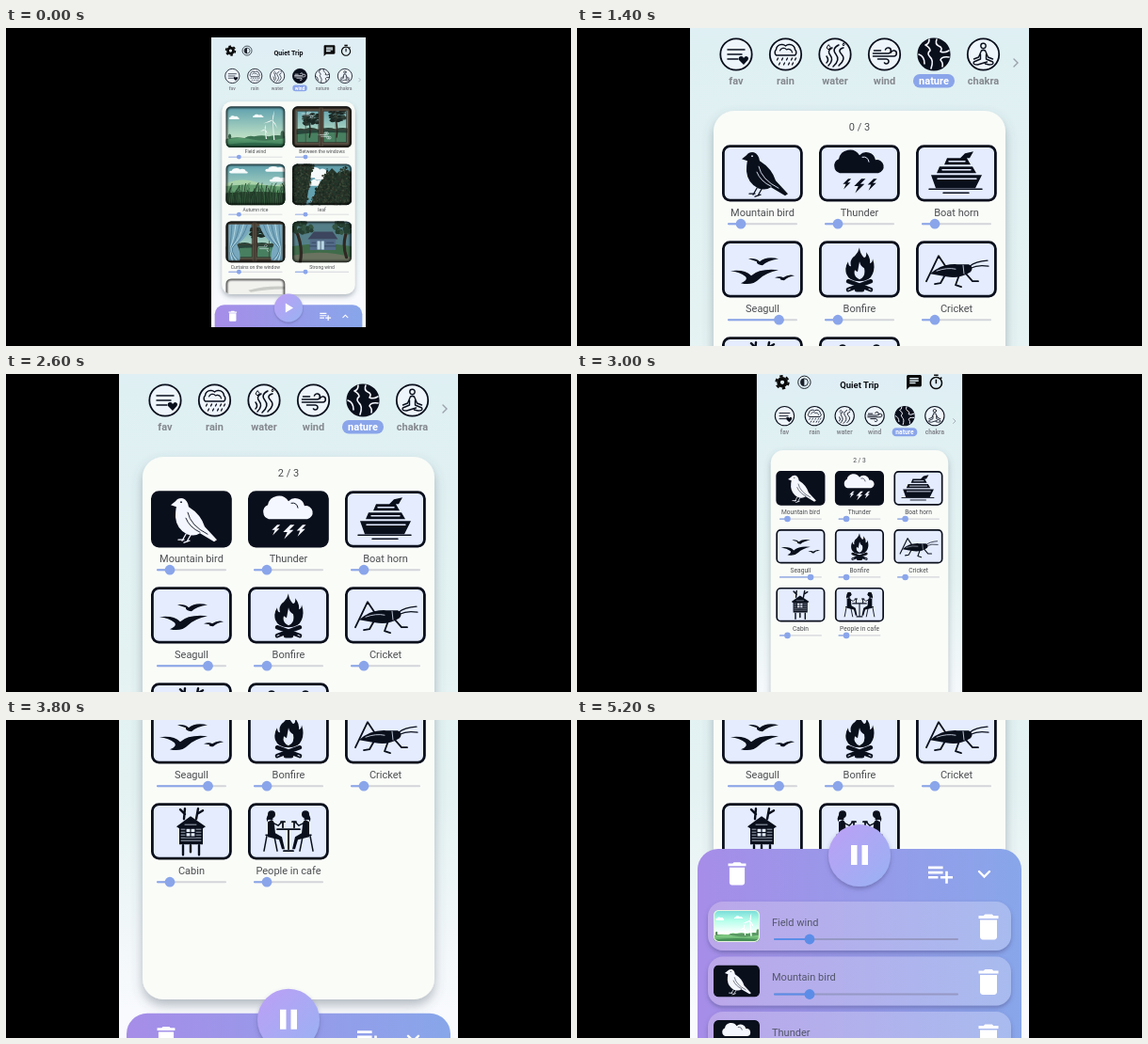
Animation, 600 px wide and 338 px high, one loop 5500 ms. Source, as an HTML page:

```html
<!DOCTYPE html>
<html lang="en">
<head>
<meta charset="utf-8">
<title>Ambient sound app</title>
<style>
html, body { margin: 0; width: 100%; height: 100%; overflow: hidden; background: #000; }
svg { display: block; width: 100vw; height: 100vh; }
text { font-family: Roboto, sans-serif; font-size: 11px; fill: #4b4d50; text-anchor: middle; }
.ink { --ink: #0a0f1c; --paper: #e4ecfd; }
.inv { --ink: #f4f7ff; --paper: #0a0f1c; }
.fill { fill: var(--ink); }
.line { fill: none; stroke: var(--ink); stroke-linecap: round; stroke-linejoin: round; }
.cut { fill: none; stroke: var(--paper); stroke-linecap: round; }
.bright { filter: hue-rotate(-14deg) brightness(1.35); }
</style>
</head>
<body>
<svg id="stage" viewBox="0 0 600 338">
  <defs id="defs">
    <linearGradient id="bg" x2="0" y2="1">
      <stop stop-color="#dfedf5"/><stop offset=".12" stop-color="#dff0f3"/>
      <stop offset=".55" stop-color="#e4f2f2"/><stop offset=".9" stop-color="#f8fafd"/>
    </linearGradient>
    <linearGradient id="bar"><stop stop-color="#a68de8"/><stop offset="1" stop-color="#88a6ea"/></linearGradient>
    <linearGradient id="rowFill"><stop stop-color="#bba7ea"/><stop offset="1" stop-color="#a8bbef"/></linearGradient>
    <linearGradient id="knob" x2="1" y2="1"><stop stop-color="#bd9ff6"/><stop offset="1" stop-color="#98b2f2"/></linearGradient>
    <linearGradient id="sky" x2="0" y2="1"><stop stop-color="#5c9fae"/><stop offset=".8" stop-color="#c4e4c6"/></linearGradient>
    <linearGradient id="grass" x2="0" y2="1"><stop stop-color="#5d9f72"/><stop offset="1" stop-color="#33704e"/></linearGradient>
    <filter id="shade" x="-20%" y="-20%" width="140%" height="150%"><feDropShadow dx="0" dy="6" stdDeviation="6" flood-color="#4a5a66" flood-opacity=".4"/></filter>
    <filter id="small" x="-20%" y="-20%" width="140%" height="150%"><feDropShadow dx="0" dy="2.5" stdDeviation="2" flood-color="#4a4a80" flood-opacity=".45"/></filter>
    <filter id="soft"><feGaussianBlur stdDeviation="2.2"/></filter>
    <clipPath id="phoneClip"><rect width="360" height="676"/></clipPath>
    <clipPath id="cardClip"><rect x="25" y="150" width="310" height="449" rx="22"/></clipPath>
    <clipPath id="tileClip"><rect width="138" height="96" rx="12"/></clipPath>
    <clipPath id="thumbClip"><rect width="49" height="34" rx="5"/></clipPath>
  </defs>
  <rect width="600" height="338"/>
  <g id="phone" clip-path="url(#phoneClip)"><g id="screen"></g><g id="panel"></g></g>
</svg>
<script>
const $ = id => document.getElementById(id);
const rect = (x, y, w, h, r, a = '') => `<rect x="${x}" y="${y}" width="${w}" height="${h}" rx="${r}" ${a}/>`;
const path = (d, a = 'class="fill"') => `<path d="${d}" ${a}/>`;
const line = (d, w = 1.5) => path(d, `class="line" stroke-width="${w}"`);
const cut = (d, w = 1) => path(d, `class="cut" stroke-width="${w}"`);
const fill = (d, c) => path(d, `fill="${c}"`);
const stroke = (d, c, w) => path(d, `fill="none" stroke="${c}" stroke-width="${w}" stroke-linecap="round"`);
const dot = (x, y, r, a = 'class="fill"') => `<circle cx="${x}" cy="${y}" r="${r}" ${a}/>`;
const text = (x, y, s, a = '') => `<text x="${x}" y="${y}" ${a}>${s}</text>`;
const at = (x, y, s, body, a = '') => `<g transform="translate(${x} ${y}) scale(${s})" ${a}>${body}</g>`;
const many = (n, f) => Array.from({ length: n }, (_, i) => f(i)).join('');
let seed = 7;
const rnd = (a, b) => a + (b - a) * ((seed = seed * 16807 % 2147483647) / 2147483647);

// Glyphs on a 24 px grid
const glyph = {
  chat: 'M20 2H4c-1.1 0-2 .9-2 2v18l4-4h14c1.1 0 2-.9 2-2V4c0-1.1-.9-2-2-2zM6 9h12v2H6V9zm8 5H6v-2h8v2zm4-6H6V6h12v2z',
  timer: 'M15 1H9v2h6V1zm-4 13h2V8h-2v6zm8.03-6.61l1.42-1.42c-.43-.51-.9-.99-1.41-1.41l-1.42 1.42C16.07 4.74 14.12 4 12 4c-4.97 0-9 4.03-9 9s4.02 9 9 9 9-4.03 9-9c0-2.12-.74-4.07-1.97-5.61zM12 20c-3.87 0-7-3.13-7-7s3.13-7 7-7 7 3.13 7 7-3.13 7-7 7z',
  trash: 'M6 19c0 1.1.9 2 2 2h8c1.1 0 2-.9 2-2V7H6v12zM19 4h-3.5l-1-1h-5l-1 1H5v2h14V4z',
  add: 'M14 10H2v2h12v-2zm0-4H2v2h12V6zm4 8v-4h-2v4h-4v2h4v4h2v-4h4v-2h-4zM2 16h8v-2H2v2z',
};
const icon = (name, x, y, s, c) => at(x - 12 * s, y - 12 * s, s, fill(glyph[name], c));

// Category icons, centred on 0,0
const tabs = {
  fav: line('M-9-5H9M-9 0H6M-9 5H2') + path('M8 11L3 6Q2 2 5.5 2Q7.5 2 8 4Q9 2 11 2Q14 3 12.5 6Z'),
  rain: line('M-10 1a4 4 0 0 1 0-6a6 6 0 0 1 10-4a6 6 0 0 1 10 4a4 4 0 0 1 0 6z') + line('M-6-4a4 4 0 0 1 7-1a4 4 0 0 1 6 3', 1.2) +
    line('M-8 4l-1 2M-3 4l-1 2M2 4l-1 2M7 4l-1 2M11 4l-1 2M-6 9l-1 2M-1 9l-1 2M4 9l-1 2M8 9l-1 2', 1.3),
  water: line('M-7 12Q-1 6-5 1T-3-7M-2 13Q6 6 1 0T4-10M4 12Q12 5 7 0T9-7M-9 9Q-6 6-9 2', 1.5) +
    line('M-7-10l-2 3 2 2 2-2zM9-12l-1 2 1 1 1-1z', 1),
  wind: line('M-12-1H4a3 3 0 1 0-3-4M-12 2H10a3 3 0 1 0-3-4M-7 5H2a2.5 2.500 0 1 1-2 4M-11-4H-4', 1.6),
  nature: line('M-5-16Q-5-11-9-10Q-4-7-4-4Q-8-1-4 3Q0 6-3 15M3-16Q1-11 5-9Q10-7 7-3Q11-1 16-4M16 3Q8 2 7 6Q10 9 9 13M-16 0Q-10 2-10 10', 1.6),
  chakra: dot(0, -9, 2.7, 'class="line" stroke-width="1.400"') +
    line('M-2-4Q0-5 2-4L5 3 10 5M-2-4L-5 3-10 5M-3 0V5L-10 8Q-12 11-6 11L4 8M3 0V5L10 8Q12 11 6 11L2 10', 1.4),
};

// Nature icons, 86 x 61
const bolt = (x, s) => at(x, 36, s, path('M0 0l-7 7h4l-3 7 9-9h-4l5-5z'));
const sitter = dot(25, 12, 4) + path('M22 11Q18 17 21 20L27 17ZM21 18Q28 17 28 23L29 32 36 36 39 49 36 49 33 39 21 36Z') +
  line('M26 21L32 24 36 20M19 34H29M20 35L17 51M28 36L31 51', 1.5);
const nature = {
  'Mountain bird': path('M21 15L26 11Q29 7 34 8Q39 10 40 17Q53 25 57 38L70 52 67 54 52 45Q46 49 38 46Q27 40 26 28Q26 20 27 17Z') +
    line('M37 46L33 53M42 47L38 54M29 52L35 52M35 55L41 53', 1.3) + cut('M39 23Q42 37 60 46M37 29Q41 39 52 44', .9) + dot(32, 12, .9, 'fill="var(--paper)"'),
  Thunder: path('M22 30a8 8 0 0 1-1-15a12 12 0 0 1 22-4a10 10 0 0 1 17 5a7 7 0 0 1 3 14z') +
    cut('M46 13Q52 12 53 18') + bolt(31, .8) + bolt(45, 1.1) + bolt(58, .9),
  'Boat horn': path('M16 32H70L63 46H21ZM22 30L25 23H60L64 30ZM30 21L33 14H54L58 21ZM47 14L52 9 61 7 57 14Z') +
    line('M14 47H70M29 51H56') + cut('M28 26.500H58M35 17.500H52M23 36H64', 1.4),
  Seagull: path('M9 32Q24 30 31 37Q40 29 60 31Q46 34 39 41Q32 48 20 45Q28 42 25 38Q19 33 9 32ZM28 19Q36 18 40 22Q47 16 60 19Q48 21 43 26Q36 25 37 22ZM56 39Q62 37 65 39Q71 35 77 37Q70 38 66 42Q61 42 62 40Z'),
  Bonfire: path('M43 7Q43 13 48 18Q51 17 50 12Q55 18 54 24Q57 23 57 19Q60 28 57 35Q54 43 43 43Q32 43 29 35Q27 28 31 22Q31 27 34 27Q32 20 38 16Q42 12 43 7Z') +
    path('M43 22Q44 27 48 29Q50 38 43 41Q36 38 38 31L41 33Z', 'fill="var(--paper)"') +
    line('M31 52L55 43M55 52L31 43M40 52L46 52', 4.5) + cut('M31 52l2-.7M55 52l-2-.7'),
  Cricket: path('M15 35Q27 24 44 25L56 25Q62 28 58 33Q46 41 32 38Z') +
    line('M57 27Q63 22 76 21M58 29Q66 25 77 27', 1.2) + line('M36 34L24 16 11 43M46 36L42 47 48 49M53 35L60 43 66 43M31 36L26 45 20 46', 1.8) + cut('M22 32Q33 28 42 30M50 26L51 35', .8),
  Cabin: path('M27 25L42 14 58 25 55 27V44H30V27Z') + line('M34 45V55M51 45V55M42 45V52M35 17L36 6M36 12L31 7M48 17L50 6M50 11L55 8', 2.4) +
    cut('M32 28H53M32 31H53M32 34H53M32 37H53M32 40H53M36 23H48', .7) + rect(37, 27, 10, 9, 0, 'fill="var(--paper)"') + line('M42 27V36M37 31.500H47M37 27H47V36H37Z', 1.2),
  'People in cafe': sitter + at(86, 0, 1, at(0, 0, '-1 1', sitter)) + line('M31 28H55M43 28V49M38 51H48M37 26V20M49 26V20M35 20H39M47 20H51', 1.8),
};

// Wind scenes, 138 x 96
const sky = '<rect width="138" height="96" fill="url(#sky)"/>';
const cloud = (x, y, sx, sy = sx) => at(x, y, `${sx} ${sy}`, fill('M-11 4a3 3 0 0 1 1-6a6 6 0 0 1 11-3a5 5 0 0 1 8 4a3 3 0 0 1 2 5z', '#f5fafa'));
const turbine = (x, y, l, base) => fill(`M${x - .7} ${y}h1.400L${x + 5} ${base}h-3z`, '#e4eeea') +
  [-80, 160, 60].map(a => `<path d="M0 0L${l * .4} -1.300L${l} 0L2 1.300z" fill="#f4f8f6" transform="translate(${x} ${y}) rotate(${a})"/>`).join('');
const tree = x => stroke(`M${x + 2} 72Q${x + 6} 54 ${x} 30`, '#2a241f', 3) +
  many(55, () => `<ellipse cx="${x + rnd(-15, 18)}" cy="${rnd(22, 46)}" rx="5" ry="2.200" transform="rotate(-6)" fill="${rnd(0, 1) < .7 ? '#1b2824' : '#2d3e35'}"/>`);
const swirl = (x, y) => stroke(`M${x} ${y}h17a3 3 0 1 0-3-3M${x + 3} ${y + 4}h20a3 3 0 1 1-3 3`, '#dfeeee', 1.3);
const frame = stroke('M3 3H135V93H3Z', '#3d372e', 10) + stroke('M8 8H130V87H8Z', '#574e41', 4) + stroke('M67 6V90', '#574e41', 11) +
  stroke('M67 6V92M12 11H61V84H12ZM73 11H126V84H73Z', '#29241f', 1.4) + stroke('M31 10V85M101 10V85M10 54H128', '#463e33', 1.6);
const outside = sky + fill('M0 60Q30 53 69 58T138 55V96H0Z', '#477f60') +
  fill('M0 59Q14 48 28 53Q46 46 60 54Q84 46 100 53Q120 46 138 54V62Q70 58 0 66Z', '#27443a');
const curtain = fill('M6 7H60Q53 36 26 54Q36 76 32 92H6Z', '#78a8bd') +
  many(5, i => stroke(`M${14 + i * 9} 8Q${12 + i * 7} 40 ${10 + i * 3} 54T${10 + i * 5} 91`, i % 2 ? '#b9dbe4' : '#4f8099', 2));
const leafy = (x, y) => x < 50 - y * .2 + 3 * Math.sin(y / 6) ||
  x > 82 - y * .45 + 3 * Math.sin(y / 5) && y > 15 + 8 * Math.sin(x / 8 + 2) + (x < 80 ? 14 : 0);
const leaves = many(1500, i => {
  const x = rnd(0, 138), y = rnd(0, 96);
  return leafy(x, y) ? dot(x.toFixed(1), y.toFixed(1), rnd(1.2, 2.6).toFixed(1), `fill="${['#1b2a20', '#3a4736', '#2b2d24', '#24382a'][i % 4]}"`) : '';
});
const blades = many(85, i => {
  const x = i * 1.7, h = rnd(44, 74), lean = rnd(-9, 12);
  return stroke(`M${x} 96Q${x} ${h + 10} ${x + lean} ${h}`, ['#1c3226', '#25402c', '#3b6844'][i % 3], rnd(.8, 2.2));
});
const wind = {
  'Field wind': sky + cloud(20, 27, .95, .7) + cloud(76, 23, 1, .6) + fill('M0 76Q20 70 44 74Q52 67 66 70Q84 66 100 70Q118 65 138 69V96H0Z', '#3d7253') +
    turbine(91, 54, 12, 76) + turbine(109, 32, 23, 78) + '<path d="M0 78Q28 70 62 77T138 74V96H0Z" fill="url(#grass)"/>' +
    fill('M0 90Q50 80 138 88V96H0Z', '#2f6b4b') +
    '<ellipse cx="9" cy="70" rx="3.5" ry="6" fill="#39634a"/><ellipse cx="132" cy="66" rx="4.5" ry="9" fill="#426b54"/>',
  'Between the windows': outside + tree(38) + tree(101) + swirl(22, 17) + swirl(60, 66) + frame + swirl(64, 66),
  'Autumn rice': sky + cloud(31, 18, 1.7, 1) + cloud(119, 14, 2, 1.1) + cloud(126, 38, 1.8, 1) + fill('M0 46Q35 30 75 44T138 42V96H0Z', '#a9d3aa') +
    fill('M0 52Q60 44 138 54V96H0Z', '#659f72') + fill('M0 68Q60 62 138 68V96H0Z', '#263f2b') + blades,
  leaf: '<rect width="138" height="96" fill="#62a0ae"/>' + cloud(62, 24, 2.1) + cloud(78, 30, 1.9) + cloud(56, 46, 1.3) +
    fill('M0 0H47L32 96H0ZM43 96L50 76 63 46 74 32 92 10 106 24 124 14 138 20V96Z', '#26342a') + leaves,
  'Curtains on the window': outside + tree(69) + swirl(76, 60) + frame + curtain + at(138, 0, '-1 1', curtain),
  'Strong wind': '<rect width="138" height="96" fill="#547f88"/>' + fill('M0 58Q70 48 138 58V96H0Z', '#3f6b4a') + fill('M0 80Q70 64 138 84V96H0Z', '#6a7360') +
    stroke('M18 96Q26 60 8 20M126 84Q114 50 130 16', '#302823', 7) + many(70, i => dot(i % 2 ? rnd(0, 45) : rnd(95, 138), rnd(2, 27), 5, `fill="${i % 3 ? '#253f32' : '#335441'}"`)) +
    fill('M36 42L50 24H94L106 42Z', '#3c465e') + rect(41, 42, 60, 25, 0, 'fill="#536b88"') + rect(58, 46, 16, 20, 0, 'fill="#b8d7e6"') +
    stroke('M66 46V66M46 50H54M80 50H96M41 58H56M76 58H101', '#293850', 1.5),
  '': '<rect width="138" height="96" fill="#f1f2ee"/>' + fill('M52 27Q90 16 138 18L138 24Q90 25 58 31Z', '#c9cbc7'),
};

const slug = s => s.replace(/ /g, '-');
const inset = rect(0, 0, 138, 96, 12, 'fill="none" stroke="#000" stroke-width="7" opacity=".75" filter="url(#soft)"');
$('defs').insertAdjacentHTML('beforeend',
  Object.entries(wind).map(([k, v]) => `<g id="w-${slug(k)}">${v}</g>`).join('') +
  Object.entries(nature).map(([k, v]) => `<g id="n-${slug(k)}">${v}</g>`).join(''));

const slider = (x, y, w, v, c = '#8aa5ea', rail = '#d3d5da') =>
  rect(x, y - 1, w, 2, 1, `fill="${rail}"`) + rect(x, y - 1, v, 2, 1, `fill="${c}"`) + dot(x + v, y, 5.4, `fill="${c}"`);

const header = at(45, 31, 1, dot(0, 0, 6.5, 'fill="none" stroke="#0a0a0a" stroke-width="6"') +
    dot(0, 0, 10.8, 'fill="none" stroke="#0a0a0a" stroke-width="3.6" pathLength="48" stroke-dasharray="4"')) +
  dot(83.5, 31, 11, 'fill="none" stroke="#1a1f28" stroke-width="1.6"') + dot(83.5, 31, 6.5, 'fill="none" stroke="#1a1f28" stroke-width="1.5"') +
  fill('M83.5 24.5a6.5 6.5 0 0 0 0 13z', '#1a1f28') +
  text(180, 41, 'Quiet Trip', 'style="font-size:15.5px;font-weight:700;fill:#0c0f14"') +
  icon('chat', 275.5, 31, 1.3, '#0a0a0a') + icon('timer', 314, 31, 1.25, '#0a0a0a');

const nav = tab => Object.keys(tabs).map((name, i) => {
  const x = 49 + i * 52.5, on = name === tab, w = name.length * 5 + 14;
  return at(x, 90, 1, dot(0, 0, 16.7, `fill="${on ? '#0a0f1c' : '#eef5fb'}" stroke="#0a0f1c" stroke-width="1.8"`) + tabs[name], `class="${on ? 'inv' : 'ink'}"`) +
    (on ? rect(x - w / 2, 111, w, 14.5, 7, 'fill="#8aa5ea"') : '') +
    text(x, 122.2, name, `style="font-weight:700;fill:${on ? '#fff' : '#85898f'}"`);
}).join('') + stroke('M344 95l4 4-4 4', '#9aa2aa', 1.4);

const windPage = picked => Object.keys(wind).map((name, i) => {
  const x = 34 + i % 2 * 155, y = 161 + (i >> 1) * 134, on = picked && !i;
  return at(x, y, 1, `<use href="#w-${slug(name)}" ${on ? 'class="bright"' : ''}/>` + (on ? '' : inset), 'clip-path="url(#tileClip)"') +
    text(x + 69, y + 110, name) + slider(x + 6, y + 118, 126, 24.5);
}).join('');

const naturePage = picked => text(180, 171, `${picked} / 3`) + Object.keys(nature).map((name, i) => {
  const x = 34 + i % 3 * 103, y = 186.2 + Math.floor(i / 3) * 102;
  return at(x, y, 1, rect(1.4, 1.4, 83, 57.5, 7, 'fill="var(--paper)" stroke="#0a0f1c" stroke-width="2.8"') +
      `<use href="#n-${slug(name)}"/>`, `class="${i < picked ? 'inv' : 'ink'}"`) +
    text(x + 43, y + 76, name) + slider(x + 6, y + 84, 74, name === 'Seagull' ? 54.5 : 14);
}).join('');

const row = (name, i) => {
  const thumb = i ? rect(0, 0, 49, 34, 5, 'fill="#0a0f1c"') + at(0, 0, .57, `<use href="#n-${slug(name)}"/>`)
    : at(0, 0, .356, `<use href="#w-${slug(name)}" class="bright"/>`) + rect(.5, .5, 48, 33, 5, 'fill="none" stroke="#e9f3e0" stroke-width="1.2"');
  return at(0, 56 + i * 58.5, 1, rect(19, 0, 322, 52, 16, 'fill="url(#rowFill)" filter="url(#small)"') +
    at(25, 9, 1, thumb, 'class="inv" clip-path="url(#thumbClip)"') +
    text(87, 25.5, name, 'style="text-anchor:start;fill:#53566a"') +
    slider(89, 40, 196, 38, '#5b8de8', '#9698c4') + icon('trash', 317, 27, 1.5, '#fff'));
};

const panel = (playing, open) => rect(8, 0, 344, 270, 22, 'fill="url(#bar)"') +
  icon('trash', 50, 26.4, 1.35, '#fff') + icon('add', 266, 26.4, 1.3, '#fff') +
  stroke(open ? 'M307 24l5.5 5.5 5.5-5.5' : 'M307 29.5l5.5-5.5 5.5 5.5', '#fff', 2.4) +
  ['Field wind', 'Mountain bird', 'Thunder'].map(row).join('') +
  dot(180, 7, 33, 'fill="url(#knob)" filter="url(#small)"') +
  fill(playing ? 'M171-4h6.5v21h-6.5zM182.5-4h6.5v21h-6.5z' : 'M173-4L191 7 173 18Z', '#fff');

const ease = (t, start, length) => {
  const p = Math.min(1, Math.max(0, (t - start) / length));
  return p * p * (3 - 2 * p);
};

let last;
function draw(t) {
  const tab = t < 1400 ? 'wind' : 'nature', playing = t >= 1000, open = t >= 3800;
  const picked = (t >= 2000) + (t >= 2300);
  const key = [tab, playing, open, picked].join();
  if (key !== last) {
    last = key;
    $('screen').innerHTML = '<rect width="360" height="676" fill="url(#bg)"/>' + header + nav(tab) +
      rect(25, 150, 310, 449, 22, 'fill="#fafcf8" filter="url(#shade)"') +
      `<g clip-path="url(#cardClip)">${tab === 'wind' ? windPage(playing) : naturePage(picked)}</g>`;
    $('panel').innerHTML = panel(playing, open);
  }
  const zoom = ease(t, 467, 233) - ease(t, 2848, 233) + ease(t, 3130, 233);
  const scale = .4556 + .5444 * zoom, top = 10 + ((t < 3100 ? -62 : -302) - 10) * zoom;
  $('phone').setAttribute('transform', `translate(${300 - 180 * scale} ${top}) scale(${scale})`);
  $('panel').setAttribute('transform', `translate(0 ${624 - 185 * ease(t, 3750, 350)})`);
}

// The picture advances ten times a second
const start = performance.now();
(function tick() {
  draw(Math.min(5200, Math.floor((performance.now() - start) % 5500 / 100) * 100));
  requestAnimationFrame(tick);
})();
</script>
</body>
</html>
```
